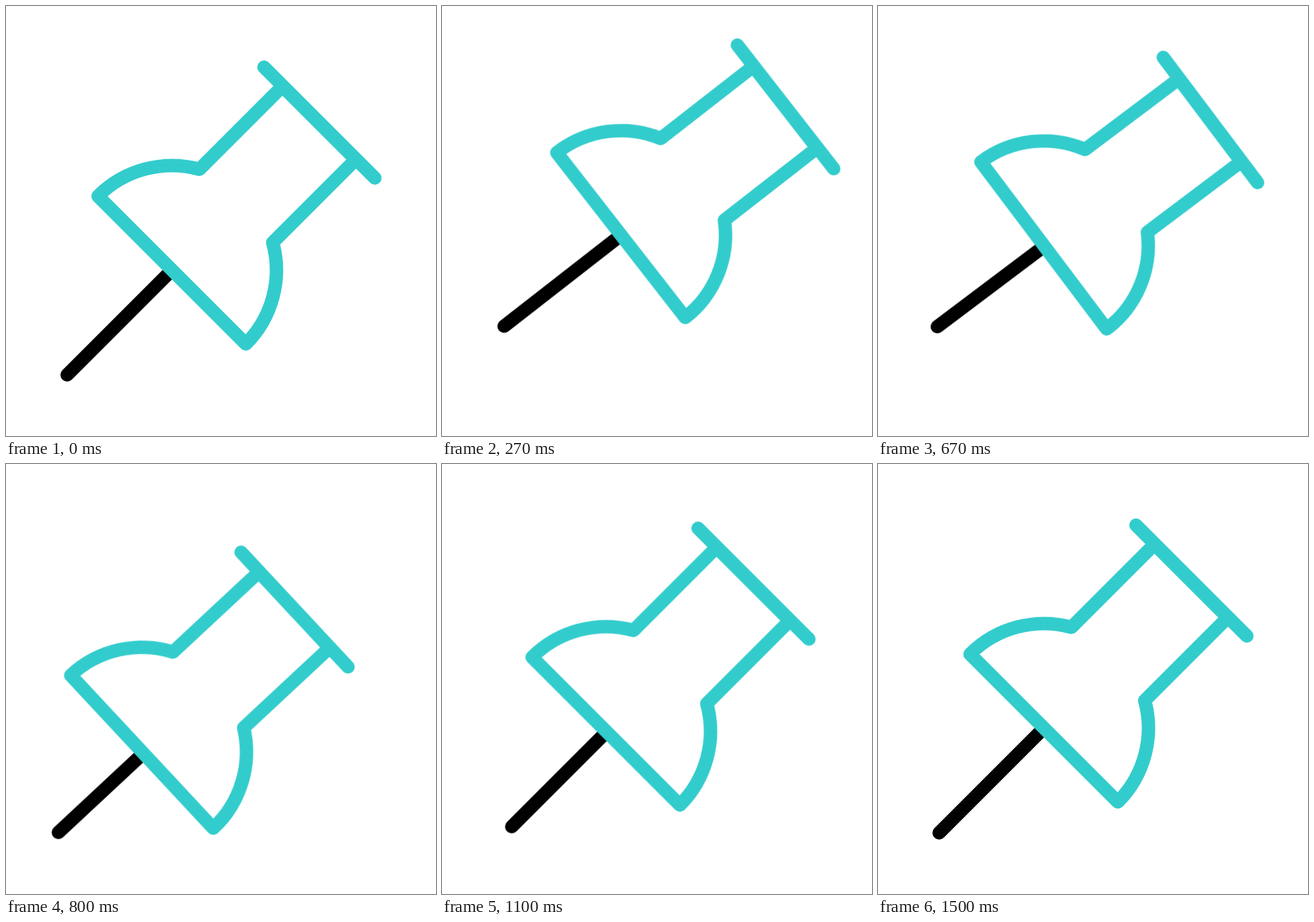
An HTML page for the animation above (2 s loop, 640 px wide and 640 px high).

```html
<!DOCTYPE html>
<html lang="en">
<head>
<meta charset="utf-8">
<title>Push pin</title>
<style>
  html, body { margin: 0; width: 100%; height: 100%; overflow: hidden; background: #fff; }
  svg { display: block; width: 100vw; height: 100vh; }

  .line {
    fill: none;
    stroke: #3cc;
    stroke-width: 20;
    stroke-linecap: round;
    stroke-linejoin: round;
  }
  .body { fill: #fff; }
  .spike { stroke: #000; }

  /* Paused: the script sets --t so that the poses advance at 30 per second. */
  .pin, .needle, .spark {
    animation: 2s cubic-bezier(.333, 0, .667, 1) infinite paused;
    animation-delay: calc(var(--t, 0) * -1ms);
    transform-origin: 0 0;
  }
  .pin { animation-name: jab; }
  .needle { animation-name: sink; }
  .spark { animation-name: burst; animation-timing-function: linear; }

  @keyframes jab {
    0% { transform: translate(247px, 393px) rotate(0deg); }
    25% { transform: translate(282.4px, 298.4px) rotate(12.86deg); }
    45% {
      transform: translate(187.6px, 452.4px) rotate(0deg);
      animation-timing-function: cubic-bezier(.16, 0, .75, 1);
    }
    62.5% { transform: translate(277.2px, 365.4px) rotate(0deg); }
    75%, 100% { transform: translate(247px, 393px) rotate(0deg); }
  }

  @keyframes sink {
    0%, 25% { transform: translate(0px, 0px); }
    45% {
      transform: translate(42.5px, -37.5px);
      animation-timing-function: cubic-bezier(.16, 0, .75, 1);
    }
    62.5%, 100% { transform: translate(0px, 0px); }
  }

  @keyframes burst {
    0%, 45% { opacity: 0; stroke-dasharray: 0 200; stroke-dashoffset: 0; }
    45.1% { opacity: 1; }
    47.17% { stroke-dasharray: 54 200; stroke-dashoffset: 0; }
    49% { stroke-dasharray: 75.6 200; stroke-dashoffset: -24.4; }
    54.6% { opacity: 1; }
    54.67%, 100% { opacity: 0; stroke-dasharray: 0 200; stroke-dashoffset: -100; }
  }
</style>
</head>
<body>
<svg viewBox="0 0 640 640">
  <g class="pin">
    <g class="needle">
      <path class="line spike" d="M0 0L-156 156"/>
      <path class="line spark" pathLength="100" d="M-177.3 138L-181.7 73"/>
      <path class="line spark" pathLength="100" d="M-135.8 169.7L-68.4 159"/>
    </g>
    <path class="line body" d="M-110 -110A155.6 155.6 0 0 1 41 -150L164.5 -273.5L273.5 -164.5L150 -41A155.6 155.6 0 0 1 110 110Z"/>
    <path class="line" d="M137 -302L302 -137"/>
  </g>
</svg>
<script>
  const LOOP = 2000, FPS = 30;
  const root = document.documentElement;
  const start = performance.now();

  // Pose changes fall on whole hundredths of a second.
  function stepAt(ms) {
    return Math.floor((Math.floor(ms / 10) * 3 + 2) / 10);
  }

  function tick() {
    const ms = (performance.now() - start) % LOOP;
    const step = Math.min(stepAt(ms), LOOP * FPS / 1000 - 1);
    root.style.setProperty('--t', step * 1000 / FPS);
    requestAnimationFrame(tick);
  }
  tick();
</script>
</body>
</html>
```
